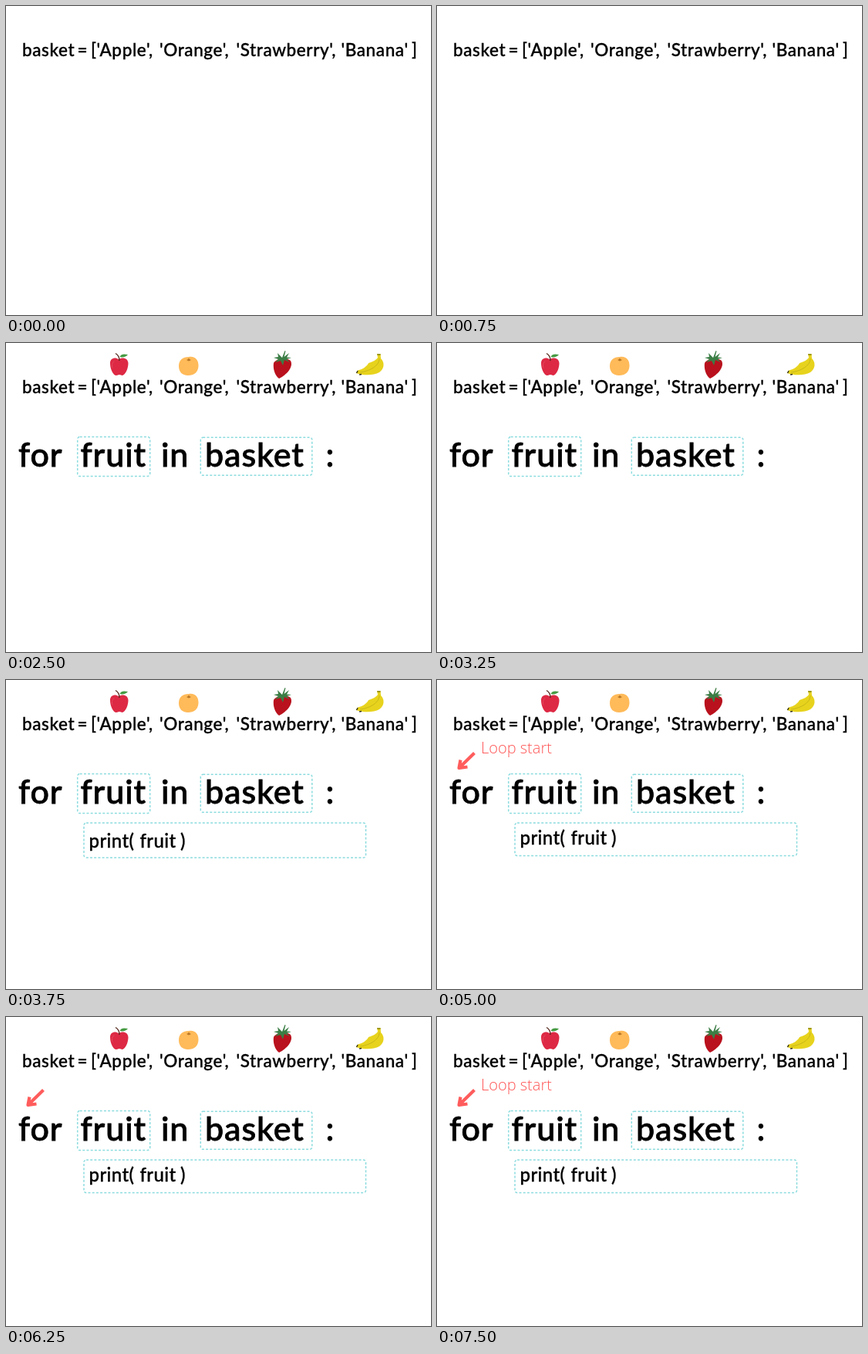
An HTML page that plays this animation: 551 px wide and 400 px high, repeating every 8000 ms.

```html
<!DOCTYPE html>
<html lang="en">
<head>
<meta charset="utf-8">
<title>For loop</title>
<style>
  html, body { margin: 0; width: 100%; height: 100%; overflow: hidden; background: #fff; }
  svg { display: block; width: 551px; height: 400px; }
  text { font-family: Lato, sans-serif; font-weight: 500; fill: #000; stroke: #000; white-space: pre; }
  .list { font-size: 22.5px; letter-spacing: .6px; stroke-width: .35px; }
  .loop { font-size: 43px; letter-spacing: .9px; stroke-width: .8px; }
  .body { font-size: 24px; letter-spacing: .4px; stroke-width: .35px; }
  .note { font: 300 20px "Open Sans", sans-serif; fill: #ff5757; stroke: none; }
  .box { fill: none; stroke: #8ddcdf; stroke-width: 1.5; stroke-dasharray: 3 2.2; }
</style>
</head>
<body>
<svg viewBox="0 0 551 400">
  <g id="list" class="list"></g>

  <g id="fruits">
    <g id="apple">
      <path d="M146 21C142 18 135 19 135 26C135 34 139 42 143 42C145 42 145 41 147 41C149 41 149 42 151 42C155 41 158.500 33 158.500 26C158 19 151 18 146 21Z" fill="#dd2944"/>
      <path d="M140 24C137 25 137 30 138 32" fill="none" stroke="#e54a60" stroke-linecap="round"/>
      <path d="M147 23C147 18 145 15 142 13.500" fill="none" stroke="#54271c" stroke-width="1.300"/>
      <path d="M147.500 18C149 14 153 14 158 15C156 18 151 19 147.500 18Z" fill="#459b43"/>
    </g>
    <g id="orange">
      <path d="M237 18C245 16.500 250 22 249.500 30C249 38 244 42 236 42C228 42 224 37 224 30C224 22 229 18 237 18Z" fill="#ffba59"/>
      <path d="M234 22L236 21L237 19.500L238 21L240 22L237 23.500Z" fill="#b87625"/>
    </g>
    <g id="strawberry">
      <path d="M347 26C349 20 364 18 369 23C373 31 364 41 354 46C348 42 346 32 347 26Z" fill="#b9111d"/>
      <path d="M358 19L361.500 10L362.500 10.500L360.500 18L367 13L364 18.500L370 19L364 21L368 25L361 22L359 29L356 23L349 25L353 21L347 19L353 18L352 13Z" fill="#3b7d45"/>
    </g>
    <g id="banana">
      <path d="M481 14L485.500 14L486 20C491 25 491 33 484 38C476 42.500 463 42 454 39L456 35.500C463 34 468 30 470 26C476 24 480 22 482 19Z" fill="#e7d31d"/>
      <path d="M484 20C484 29 473 36 459 38" fill="none" stroke="#c5b318" stroke-width=".9"/>
      <path d="M481 14L485.500 14L485.500 16L481.500 16Z" fill="#9c971d"/>
      <path d="M454.500 39L456 36M458 41L461 40.500" fill="none" stroke="#39351b" stroke-width="1.500"/>
    </g>
  </g>

  <g id="loop" class="loop">
    <rect class="box" x="92.700" y="121.500" width="94" height="51" rx="3"/>
    <rect class="box" x="252.300" y="122.300" width="144.500" height="49" rx="3"/>
  </g>

  <g id="body" class="body">
    <rect id="frame" class="box" x="101" y="185" width="365.500" height="45" rx="3"/>
    <g id="call"></g>
  </g>

  <path id="arrow" d="M48.500 94.500L29 113.500M30.500 103.500L28.500 114L39.500 112.500" fill="none"
    stroke="#ff5c5c" stroke-width="4.200" stroke-linejoin="round"/>
  <text id="note" class="note" x="57" y="94.500">Loop start</text>
</svg>
<script>
const NS = 'http://www.w3.org/2000/svg';
const LOOP = 8000, STEP = 1250;
const $ = id => document.getElementById(id);

function write(id, y, words) {
  for (const [x, word] of words) {
    const text = document.createElementNS(NS, 'text');
    text.setAttribute('x', x);
    text.setAttribute('y', y);
    text.textContent = word;
    $(id).append(text);
  }
}

write('list', 65, [[21, 'basket'], [92.5, '='], [110, "['Apple',"], [199, "'Orange',"],
  [298.5, "'Strawberry',"], [434.5, "'Banana'"], [526, ']']]);
write('loop', 160, [[16, 'for'], [96.5, 'fruit'], [201, 'in'], [258, 'basket'], [414.5, ':']]);
write('call', 217, [[107.5, 'print('], [173.5, 'fruit'], [226, ')']]);

const show = (id, on) => { $(id).style.visibility = on ? 'visible' : 'hidden'; };

function draw(now) {
  const step = Math.floor(now % LOOP / STEP);
  show('fruits', step >= 1);
  show('loop', step >= 2);
  show('body', step >= 3);
  show('arrow', step >= 4);
  show('note', step >= 4 && step !== 5);
  const settled = step >= 4;
  $('frame').setAttribute('height', settled ? 42.5 : 45);
  $('call').setAttribute('transform', `translate(0 ${settled ? -4 : 0})`);
}

const start = performance.now();
function tick() {
  draw(performance.now() - start);
  requestAnimationFrame(tick);
}
tick();
</script>
</body>
</html>
```
